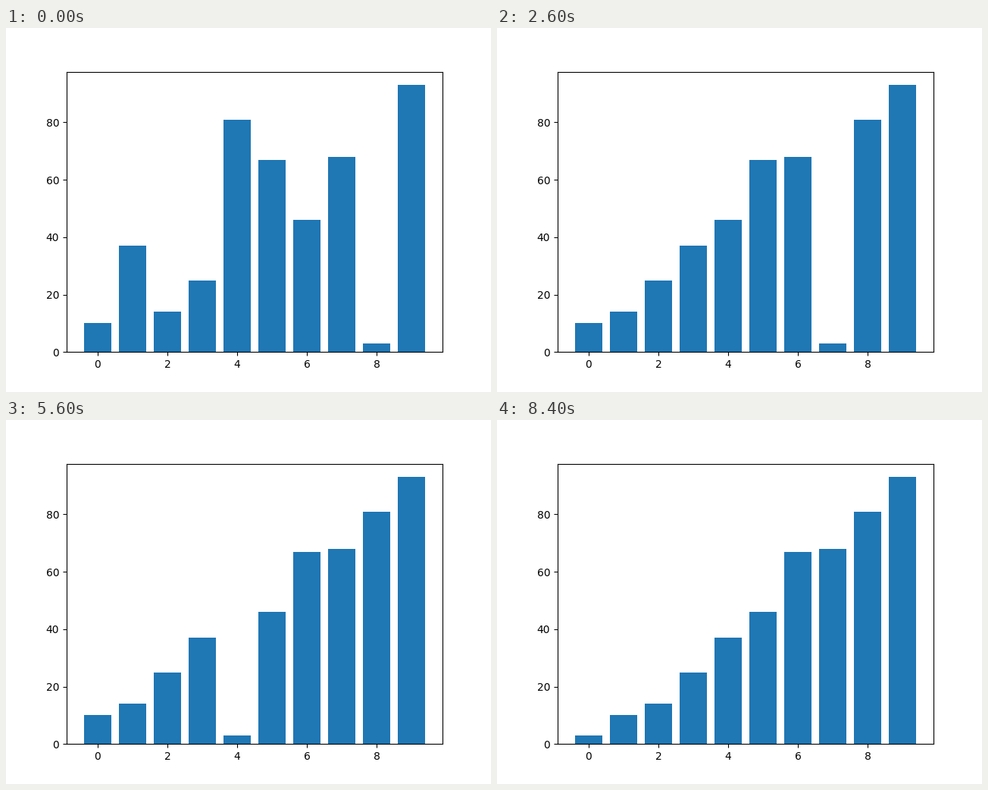
Recreate the animation shown at these times as a matplotlib script. Size 640 by 480 pixels, loop 9000 ms.

```python
import matplotlib.pyplot as plt
from matplotlib.animation import FuncAnimation

VALUES = [10, 37, 14, 25, 81, 67, 46, 68, 3, 93]
STEP_MS = 200


def bubble_steps(values):
    """Return the list's state after every comparison of a bubble sort."""
    data = list(values)
    steps = []
    for end in range(len(data) - 1, 0, -1):
        for j in range(end):
            if data[j] > data[j + 1]:
                data[j], data[j + 1] = data[j + 1], data[j]
            steps.append(list(data))
    return steps


steps = bubble_steps(VALUES)

fig, ax = plt.subplots(figsize=(6.4, 4.8), dpi=100)
bars = ax.bar(range(len(VALUES)), VALUES, color="#1f77b4")
ax.set_ylim(0, max(VALUES) * 1.05)


def update(i):
    for bar, height in zip(bars, steps[i]):
        bar.set_height(height)
    return list(bars)


anim = FuncAnimation(fig, update, frames=len(steps), interval=STEP_MS,
                     repeat=True, repeat_delay=0, blit=False)
plt.show()
```
